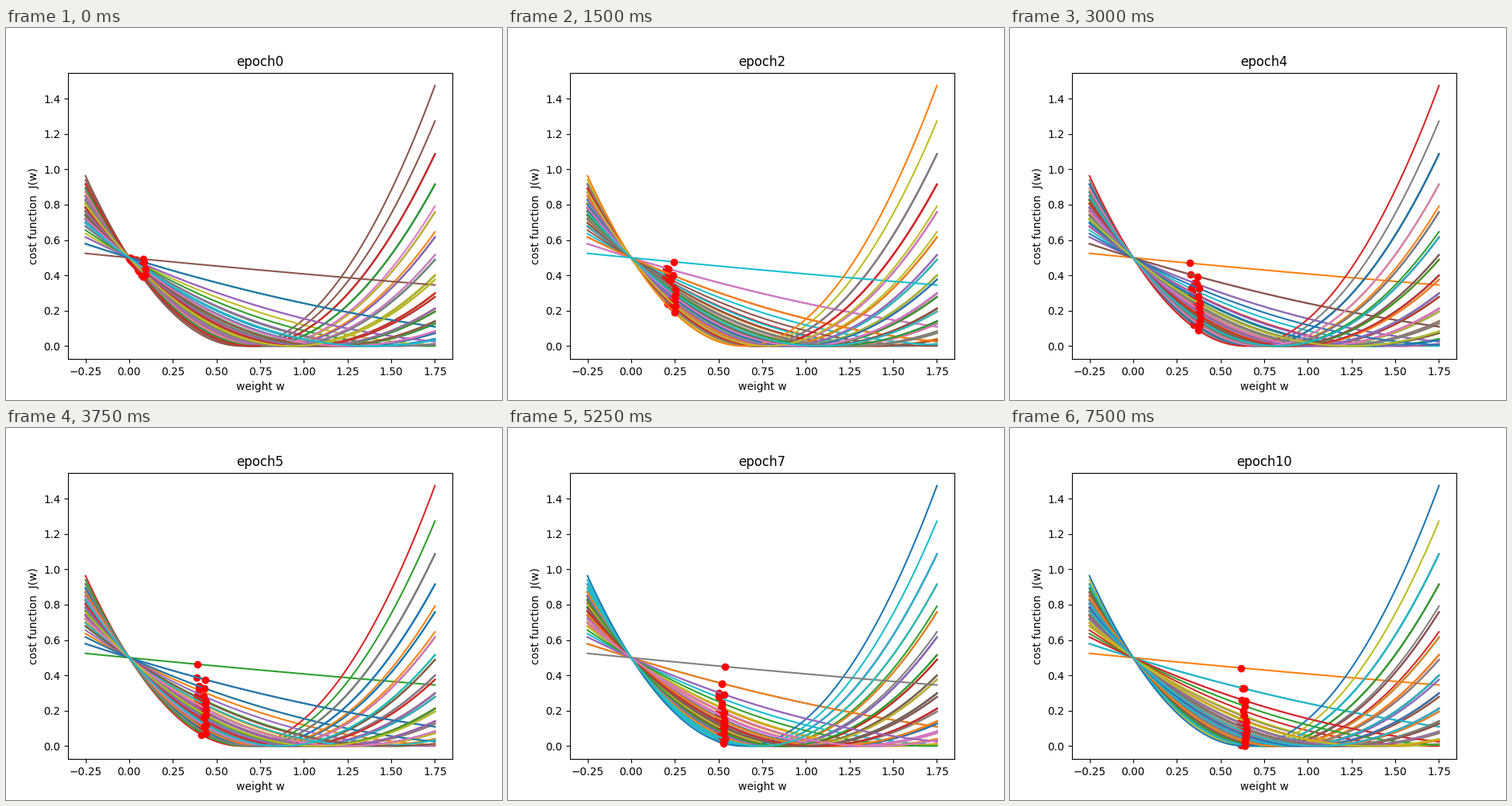
Animation of 640x480 px, one loop 8 s. Source, as a matplotlib script:

```python
import numpy as np
import matplotlib.pyplot as plt
from matplotlib.animation import FuncAnimation

RATE = 0.001
EPOCHS = 11
INTERVAL = 250
FRAMES_PER_EPOCH = 3
N_FRAMES = 32
HALF = 50
MEAN, STD = 28.61, 14.4228

# Two classes of measurements in tenths: a logistic spread and a skewed one
rank = np.arange(HALF)
p = (rank + 0.5) / HALF
low = np.round(14.6 + 0.95 * np.log(p / (1 - p)))
high = np.round(np.interp(rank, [0, 1, 2, 3, 8, 12, 47, 48, 49],
                          [30, 33, 33, 34.6, 38.6, 40, 49.4, 50, 51]))

feature = (np.concatenate([low, high]) - MEAN) / STD
target = np.repeat([-1, 1], HALF)


def cost(w, sample):
    return 0.5 * (target[sample] - w * feature[sample]) ** 2


def train():
    """Shuffled samples and the weight after each step, for every epoch."""
    rng = np.random.default_rng(1)
    w, runs = 0.0, []
    for _ in range(EPOCHS):
        order, weights = rng.permutation(2 * HALF), []
        for s in order:
            w += RATE * (target[s] - w * feature[s]) * feature[s]
            weights.append(w)
        runs.append((order, weights))
    return runs


runs = train()
grid = np.linspace(-0.25, 1.75, 100)

fig, ax = plt.subplots(figsize=(6.4, 4.8), dpi=100)
ax.set_xlabel("weight w")
ax.set_ylabel("cost function  J(w)")
title = ax.set_title("epoch0")

# Each step lays its curve and then its dot over the earlier ones
curves, dots = [], []
for sample, w in zip(*runs[0]):
    curves += ax.plot(grid, cost(grid, sample))
    dots += ax.plot([w], [cost(w, sample)], "ro")


def update(frame):
    epoch = frame // FRAMES_PER_EPOCH
    title.set_text(f"epoch{epoch}")
    for curve, dot, sample, w in zip(curves, dots, *runs[epoch]):
        curve.set_ydata(cost(grid, sample))
        dot.set_data([w], [cost(w, sample)])
    return [title, *curves, *dots]


anim = FuncAnimation(fig, update, frames=N_FRAMES, init_func=lambda: update(0),
                     interval=INTERVAL, repeat=True, repeat_delay=0, blit=False)
plt.show()
```
